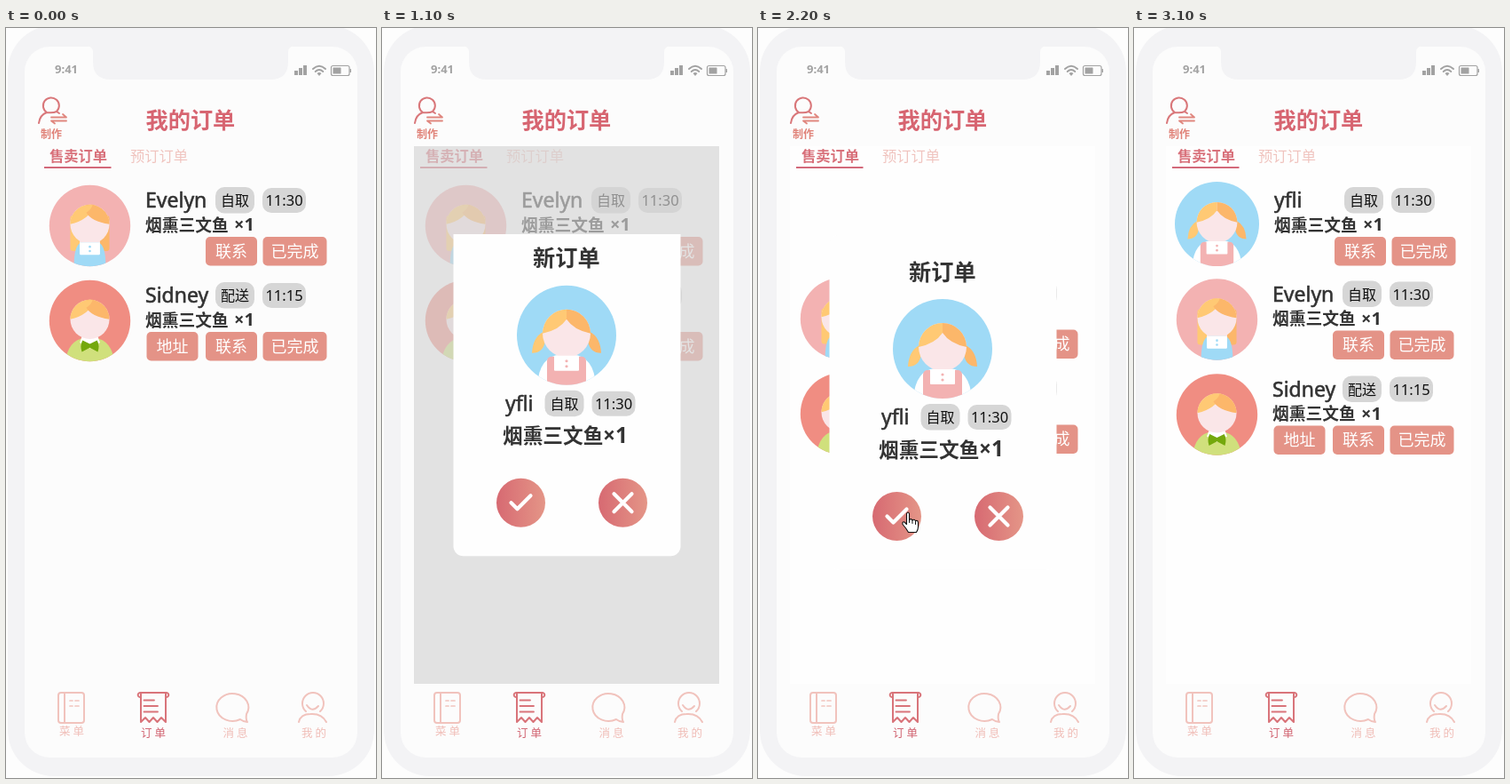
Write an HTML page with a canvas that moves like this. It is 417 by 844 pixels and loops after 3400 ms.

```html
<!DOCTYPE html>
<html lang="zh">
<head>
<meta charset="utf-8">
<title>我的订单</title>
<style>
html, body { margin: 0; width: 100%; height: 100%; overflow: hidden; background: #fdfdfd; }
canvas { display: block; width: 417px; height: 844px; }
</style>
</head>
<body>
<canvas id="stage"></canvas>
<script>
const canvas = document.getElementById('stage');
const ctx = canvas.getContext('2d');
const dpr = window.devicePixelRatio || 1;
canvas.width = 417 * dpr;
canvas.height = 844 * dpr;

const LOOP = 3400, STEP = 100, SPRING = 680;
const CJK = '"Noto Sans CJK SC", "Noto Sans CJK", sans-serif';
const LATIN = '"Noto Sans", "Open Sans", sans-serif';
const C = {
  rose: '#d76571', coral: '#e49387', pale: '#f1c3bd', ink: '#333', badge: '#d6d6d6',
  yellow: '#ffc974', orange: '#fcb76a', face: '#fae6e8', sky: '#9fdaf6', pink: '#f3b2b2',
  panel: '#fefefe'
};

// ---- helpers ----
function fillPath(d, color) {
  ctx.fillStyle = color;
  ctx.fill(new Path2D(d));
}

function strokePath(d, color, width = 2) {
  ctx.strokeStyle = color;
  ctx.lineWidth = width;
  ctx.lineCap = ctx.lineJoin = 'round';
  ctx.stroke(new Path2D(d));
}

function box(x, y, w, h, r, color) {
  ctx.beginPath();
  ctx.roundRect(x, y, w, h, r);
  ctx.fillStyle = color;
  ctx.fill();
}

function disc(x, y, r, color) {
  ctx.beginPath();
  ctx.arc(x, y, r, 0, Math.PI * 2);
  ctx.fillStyle = color;
  ctx.fill();
}

function text(str, x, y, size, color, { weight = 400, family = CJK, align = 'left', spacing = 0 } = {}) {
  ctx.font = `${weight} ${size}px ${family}`;
  ctx.letterSpacing = spacing + 'px';
  ctx.textAlign = align;
  ctx.fillStyle = color;
  ctx.fillText(str, x, y);
  ctx.letterSpacing = '0px';
}

// Chinese text placed by its vertical middle
function han(str, x, mid, size, color, opts) {
  text(str, x, mid + size * 0.38, size, color, opts);
}

function nameText(str, x, base) {
  text(str, x, base, 23, C.ink, { family: LATIN });
  ctx.strokeStyle = C.ink;
  ctx.lineWidth = 0.6;
  ctx.strokeText(str, x, base);
}

function dish(x, mid, size) {
  han('烟熏三文鱼', x, mid, size, C.ink, { weight: 700 });
}

function amount(x, base, size) {
  text('×1', x, base, size, C.ink, { weight: 700, family: LATIN });
}

function clipped(x, y, w, h, draw) {
  ctx.save();
  ctx.beginPath();
  ctx.rect(x, y, w, h);
  ctx.clip();
  draw();
  ctx.restore();
}

function springOut(ms) {
  const u = ms / SPRING;
  if (u <= 0) return 0;
  if (u >= 1) return 1;
  return 1 + 2 ** (-10 * u) * Math.sin((u - 0.075) * Math.PI * 2 / 0.3);
}

// ---- avatars, drawn in a circle of radius 56 ----
function avatar(kind, x, y, r) {
  ctx.save();
  ctx.translate(x, y);
  ctx.scale(r / 56, r / 56);
  disc(0, 0, 56, { braids: C.sky, long: C.pink, boy: '#f08d82' }[kind]);
  ctx.beginPath();
  ctx.arc(0, 0, 56, 0, Math.PI * 2);
  ctx.clip();
  people[kind]();
  ctx.restore();
}

function head() {
  disc(0, -2, 27, C.face);
}

function parting() {
  fillPath('M-27-2A27 27 0 0 1 0-29V-18Q-8-6-27-2Z', C.yellow);
  fillPath('M0-29A27 27 0 0 1 27-2Q8-6 0-18Z', C.orange);
}

function sideFringe() {
  fillPath('M-27-2A27 27 0 0 1 8-28Q-2-8-27-2Z', C.yellow);
  fillPath('M-8-28A27 27 0 0 1 27-2Q2-6-5-18Q2-22 4-29Z', C.orange);
}

function bib(color) {
  box(-14, 23, 28, 17, 1, '#fff');
  disc(0, 29, 1.6, color);
  disc(0, 35, 1.6, color);
}

const people = {
  braids() {
    fillPath('M-33 57Q-31 24-8 22H8Q31 24 33 57Z', '#fff');
    fillPath('M-26-4Q-38 2-39 20Q-26 20-24 6Z', C.yellow);
    fillPath('M26-4Q38 2 39 20Q26 20 24 6Z', C.orange);
    head();
    parting();
    box(-22, 24, 44, 40, 5, C.pink);
    bib(C.pink);
  },
  long() {
    box(-27, -14, 27, 49, 4, C.yellow);
    box(0, -14, 27, 49, 4, C.orange);
    fillPath('M-14 10H14V30H-14Z', C.face);
    head();
    sideFringe();
    fillPath('M-12 23Q-22 27-22 57H22Q22 27 12 23Z', C.sky);
    bib(C.sky);
  },
  boy() {
    fillPath('M-34 57Q-30 27-8 24H8Q30 27 34 57Z', '#d0e07c');
    fillPath('M-11 22H11L14 30 0 38-14 30Z', '#fff');
    head();
    sideFringe();
    fillPath('M0 32L-10 27Q-14 34-11 43L0 37 11 43Q14 34 10 27Z', '#74a80c');
  }
};

// ---- phone frame and fixed parts ----
function shell() {
  ctx.fillStyle = '#fdfdfd';
  ctx.fillRect(0, 0, 417, 844);
  box(2, -3, 413, 845, 52, '#f3f3f5');
  box(21, 21, 375, 800, 28, '#fcfcfc');
  fillPath('M92 20.5Q98 21 98 27V38Q98 58 118 58H298Q318 58 318 38V27Q318 21 324 20.5Z', '#f3f3f5');
  statusBar();
  strokePath('M46 95A9 9 0 1 1 57 94Q53 96 46 95Q38 98 37 107M57 94L60 96', '#d9777a');
  strokePath('M51 100.5H68L64 97M68 104.5H51L55 107.5', '#e0877f', 1.8);
  han('制作', 39, 119, 12, '#e08278', { weight: 700 });
  han('我的订单', 157.5, 103, 25.2, C.rose, { weight: 700 });
}

function statusBar() {
  const gray = '#a2a2a2';
  text('9:41', 55, 51, 13, gray, { weight: 700, family: '"Open Sans", sans-serif' });
  for (let i = 0; i < 3; i++) ctx.fillRect(325 + i * 5, 48 - i * 3, 4, 5 + i * 3);
  strokePath('M346 46Q353 39.5 360 46M348.7 49Q353 45 357.3 49', gray, 1.9);
  fillPath('M350.5 51Q353 49 355.5 51L353 54Z', gray);
  ctx.strokeStyle = gray;
  ctx.lineWidth = 1.2;
  ctx.beginPath();
  ctx.roundRect(366.5, 42.5, 20.5, 11, 2);
  ctx.stroke();
  box(368.5, 44.5, 9, 7, 0.5, gray);
  box(387.5, 46, 1.5, 4, 0.5, gray);
}

function navBar() {
  const on = '#d9747a';
  strokePath('M62 748H85Q88 748 88 751V779Q88 782 85 782H62Q59 782 59 779V751Q59 748 62 748ZM66 748V782', C.pale);
  strokePath('M72 757H75M78 757H82M72 763H75M78 763H82', C.pale, 1.7);
  strokePath('M152 753A2.6 2.6 0 1 1 152 748H180A2.6 2.6 0 1 1 180 753M152 748V781L157 776 161.5 781 166 776 170.5 781 175 776 180 781V748', on);
  strokePath('M155.5 756.5H167M155.5 763H171M155.5 769.5H171', on, 1.8);
  strokePath('M272 781Q268 781 264 778A18 15.5 0 1 1 271 772Q270 778 272 781Z', C.pale);
  strokePath('M338 769A12 12 0 1 1 354 769M339 762Q345 771 352 763M330 781Q332 772 343 772Q356 771 361 781', C.pale);
  const labels = [['菜单', 60, 791], ['订单', 152, 793], ['消息', 244.5, 793], ['我的', 333, 793]];
  labels.forEach(([s, x, y], i) => han(s, x, y, 12.5, i === 1 ? '#d0606e' : '#f0bdb7', { spacing: 3 }));
}

function tabs() {
  han('售卖订单', 49, 144, 16.3, '#d8707a', { weight: 700 });
  han('预订订单', 140, 144, 16.3, '#f0c4bf');
  box(43, 156, 75.5, 2, 0, '#d3697a');
}

// ---- order parts ----
function badges(x, y, way, time) {
  box(x, y, 44, 29.5, 10, C.badge);
  box(x + 53, y + 1, 49, 28, 10, C.badge);
  han(way, x + 22, y + 15, 16, '#111', { align: 'center' });
  text(time, x + 77.5, y + 21, 16.5, '#111', { family: LATIN, align: 'center' });
}

function button(label, x, w) {
  box(x, 235, w, 32.5, 5, C.coral);
  han(label, x + w / 2, 251, 18, '#fff', { align: 'center' });
}

function order(dx, dy, o) {
  ctx.save();
  ctx.translate(dx, dy);
  avatar(o.kind, ...(o.face || [94.5, 222.5, 45.7]));
  nameText(o.name, 157, 202);
  badges(236, 179, o.way, o.time);
  dish(157, 221.5, 18.8);
  amount(257, 228, 20);
  if (o.address) button('地址', 158.5, 58);
  button('联系', 225, 58);
  button('已完成', 289.5, 72);
  ctx.restore();
}

const first = { name: 'Evelyn', kind: 'long', way: '自取', time: '11:30' };
const second = { name: 'Sidney', kind: 'boy', way: '配送', time: '11:15', address: true };
const fresh = { name: 'yfli', kind: 'braids', way: '自取', time: '11:30', face: [92.5, 220.5, 47.5] };

function orderList(dx, dy) {
  order(dx, dy, first);
  order(dx, dy + 107, second);
}

// ---- new order card ----
function roundButton(x, y, mark) {
  const g = ctx.createLinearGradient(x - 27, 0, x + 27, 0);
  g.addColorStop(0, '#d76a72');
  g.addColorStop(1, '#e49587');
  disc(x, y, 27.5, g);
  ctx.save();
  ctx.translate(x, y);
  strokePath(mark, '#fff', 4.2);
  ctx.restore();
}

function card(top) {
  clipped(80, 232, 257, 378, () => {
    ctx.translate(0, top - 233);
    box(80.5, 233, 256, 376.5, 11, C.panel);
    han('新订单', 170, 274, 25.2, C.ink, { weight: 700 });
    avatar('braids', 208, 361, 56);
    nameText('yfli', 139, 446);
    badges(183.5, 423, '自取', '11:30');
    dish(136, 474, 22.7);
    amount(249, 482, 24.5);
    roundButton(156.5, 549.5, 'M-11 0L-4 7 11-8');
    roundButton(271.5, 549.5, 'M-10-10L10 10M10-10L-10 10');
  });
}

// ---- pointer ----
const moves = [
  [1500, 400, 566], [1600, 239, 504], [1700, 205, 502], [1800, 190, 521],
  [1900, 167, 544], [2900, 240, 470], [3000, 392, 201]
];

function pointer(t) {
  if (t < 1500 || t >= 3100) return;
  const [, x, y] = moves.filter(m => m[0] <= t).pop();
  const hand = t >= 2000 && t < 2300;
  const d = hand
    ? 'M0 2Q1.5-1 3 2V9Q5 7 6.5 9.5Q8.5 7.7 10 10.2Q12.5 9 13 12V17Q13 20 11 23H2Q0 19-4.5 14Q-5 10.5-2.5 11.5L0 14Z'
    : 'M0 0V16L4 12.5 6.5 18.5 9 17.5 6.5 11.5H11.5Z';
  ctx.save();
  ctx.translate(x + 0.5, y + 0.5);
  fillPath(d, '#fff');
  strokePath(d, '#111', 1.1);
  if (hand) strokePath('M3 9V12M6.5 10V13M10 11V14', '#111', 1);
  ctx.restore();
}

// ---- scene ----
function draw(t) {
  ctx.setTransform(dpr, 0, 0, dpr, 0, 0);
  shell();
  navBar();
  const accepted = t >= 2200;
  if (accepted) box(36, 133, 344, 605, 0, C.panel);
  tabs();

  if (accepted) {
    const p = springOut(t - 2258);
    orderList(-1, t < 2400 ? 104.5 : 105.5);
    if (p > 0) clipped(46, 165, 317, 104, () => order(1 - 320 * (1 - p), 0, fresh));
    if (p < 1) card(233 + 377 * p);
  } else {
    orderList(0, 0);
    if (t >= 800) {
      box(36, 133, 344, 605, 0, 'rgba(212,212,212,0.65)');
      card(610 - 377 * springOut(t - 787.4));
    }
  }
  pointer(t);
}

function tick() {
  const t = performance.now() % LOOP;
  draw(Math.floor(t / STEP) * STEP);
  requestAnimationFrame(tick);
}
tick();
</script>
</body>
</html>
```
